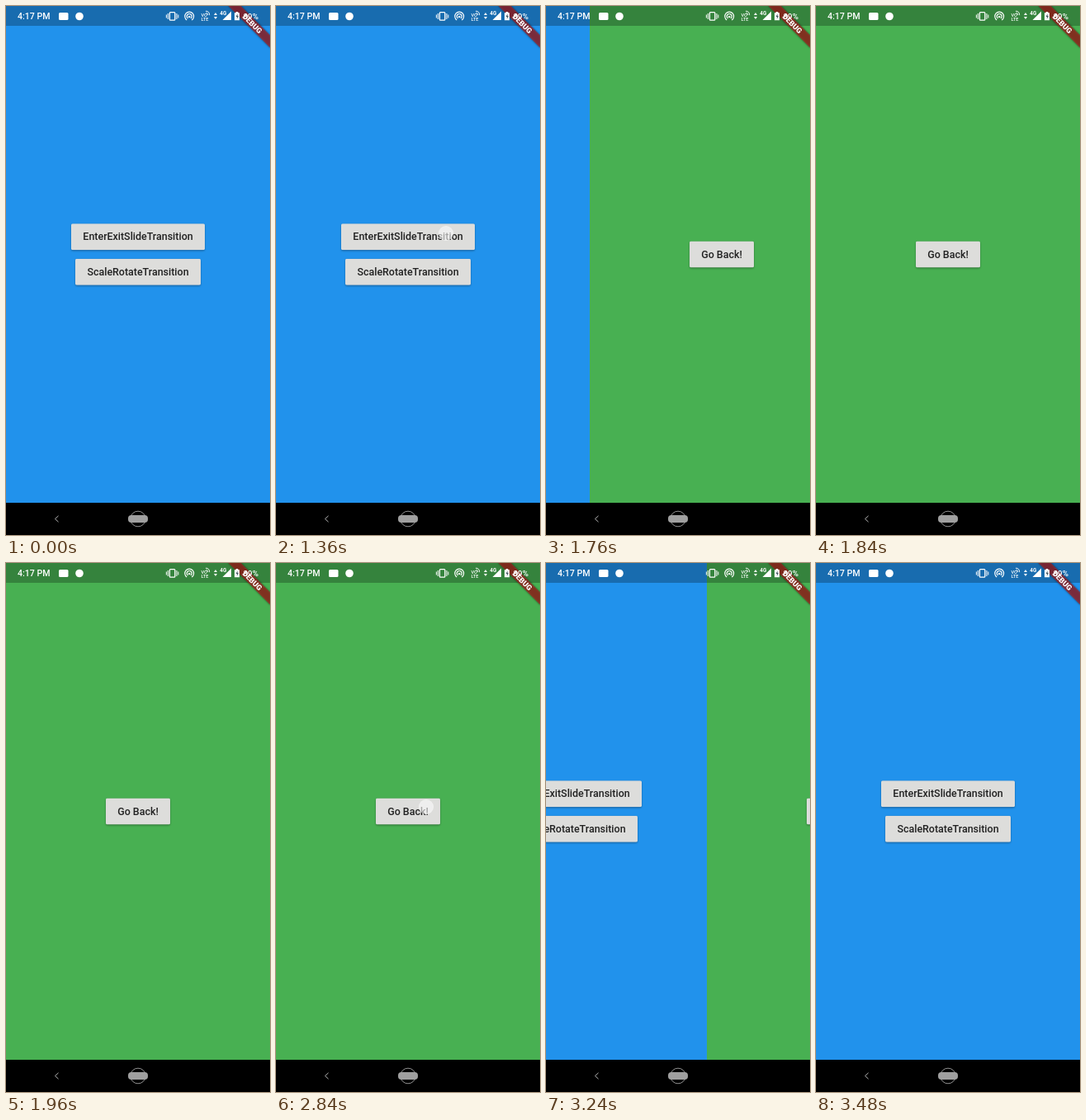
Animation, 320 px wide and 640 px high, one loop 3.56 s. Source, as an HTML page:

```html
<!DOCTYPE html>
<html lang="en">
<head>
<meta charset="utf-8">
<title>Enter/exit slide transition</title>
<style>
  html, body { margin: 0; width: 100%; height: 100%; overflow: hidden; background: #000; }
  svg { display: block; }
  text { font-family: Roboto, sans-serif; font-weight: 500; fill: #fff; }
  .button text { font-size: 12.44px; fill: #212121; text-anchor: middle; }
  .line { fill: none; stroke: #fff; }
</style>
</head>
<body>
<svg id="stage" width="320" height="640" viewBox="0 0 320 640">
  <defs>
    <filter id="blur" x="-20%" y="-60%" width="140%" height="220%"><feGaussianBlur stdDeviation="1"/></filter>
  </defs>

  <g id="home"><rect width="320" height="601" fill="#2192ec"/></g>
  <g id="detail"><rect width="320" height="601" fill="#48b052"/></g>

  <rect width="320" height="24" opacity=".26"/>
  <g transform="translate(320 0) rotate(45)">
    <rect x="-36" y="24.9" width="72" height="10.7" opacity=".5" filter="url(#blur)"/>
    <rect x="-36" y="24.9" width="72" height="10.7" fill="#b71c1c" opacity=".63"/>
    <text y="33.5" font-size="9.07" style="font-weight:900" text-anchor="middle">DEBUG</text>
  </g>

  <g id="status" fill="#fff">
    <text x="14" y="16.3" font-size="10.6">4:17 PM</text>
    <rect x="64" y="8" width="11.5" height="9" rx="1.5"/>
    <circle cx="89" cy="12.5" r="4.8"/>
    <!-- vibrate -->
    <rect class="line" x="198.4" y="7.6" width="6.4" height="9.6" rx="1" stroke-width="1.3"/>
    <path class="line" d="M196.3 9v7M194.4 10.5v4M206.9 9v7M208.8 10.5v4"/>
    <!-- hotspot -->
    <path class="line" stroke-width="1.2" d="M219.2 17a5.4 5.4 0 1 1 6 0M220.4 14.9a3 3 0 1 1 3.6 0"/>
    <circle cx="222.2" cy="13" r="1.3"/>
    <!-- VoLTE -->
    <text x="236.5" y="12.5" font-size="5.5">VO</text>
    <text x="236.5" y="18.3" font-size="5.5">LTE</text>
    <path class="line" stroke-width=".9" d="M242 6.2q4.7 0 4.7 5M242.5 8.4q2.3 0 2.3 2.6"/>
    <path d="M252 11l2-3 2 3zM252 13l2 3 2-3z"/>
    <!-- signal and battery -->
    <text x="259.3" y="11.3" font-size="6.3" style="font-weight:700">4G</text>
    <path d="M273 6.5v10.5h-10.5z"/>
    <path d="M278.7 7h2.6v1.2h1.7v9h-6v-9h1.7z"/>
    <path d="M280.6 9.5l-2 3.5h1.3v2.7l2-3.6h-1.3z" fill="#465a66"/>
    <text x="287.5" y="16" font-size="9.8">89%</text>
  </g>

  <rect y="601" width="320" height="39"/>
  <path class="line" d="M63.5 616.8l-3.9 3.7 3.9 3.7" opacity=".7"/>
  <circle class="line" cx="160" cy="620.5" r="9.3" stroke-width=".8" opacity=".7"/>
  <rect x="148" y="616" width="24" height="9" rx="4" fill="#a0a0a0"/>

  <circle id="touch" r="9" fill="#fff"/>
</svg>
<script>
const LOOP = 3560, STEP = 40, SLIDE = 300, WIDTH = 320;
const PUSH = 1510, POP = 3057;
const $ = id => document.getElementById(id);
const clamp = v => Math.min(1, Math.max(0, v));

function addButton(page, label, x, y, w, press) {
  $(page).insertAdjacentHTML('beforeend', `
    <rect x="${x}" y="${y + 1}" width="${w}" height="32" rx="2" opacity=".32" filter="url(#blur)"/>
    <svg class="button" x="${x}" y="${y}" width="${w}" height="32">
      <rect width="${w}" height="32" rx="1.8" fill="#dddddb"/>
      <rect class="highlight" width="${w}" height="32" rx="1.8" fill="#bcbcbc" opacity="0"/>
      <circle class="splash" fill="#c8c8c8" opacity="0"/>
      <text x="${w / 2}" y="20.3">${label}</text>
    </svg>`);
  if (!press) return;
  const node = $(page).lastElementChild;
  press.highlight = node.querySelector('.highlight');
  press.splash = node.querySelector('.splash');
  press.splash.setAttribute('cx', press.x - x);
  press.splash.setAttribute('cy', press.y - y);
}

const presses = [
  { x: 206, y: 275, down: 1360, up: 1480 },
  { x: 182, y: 295, down: 2840, up: 3020 }
];
addButton('home', 'EnterExitSlideTransition', 79, 263.2, 162, presses[0]);
addButton('home', 'ScaleRotateTransition', 84, 305.8, 152);
addButton('detail', 'Go Back!', 121, 284.5, 78, presses[1]);

function drawPress(p, t) {
  const age = t - p.down;
  const fade = age < 0 ? 0 : 1 - clamp((t - p.up) / 200);
  p.highlight.setAttribute('opacity', .4 * fade * clamp(age / 200));
  p.splash.setAttribute('opacity', .4 * fade);
  p.splash.setAttribute('r', Math.max(0, 8 + age * .16));
}

function draw(t) {
  const shown = clamp((t - PUSH) / SLIDE) - clamp((t - POP) / SLIDE);
  const edge = Math.round(WIDTH * (1 - shown));
  $('home').setAttribute('transform', `translate(${edge - WIDTH} 0)`);
  $('detail').setAttribute('transform', `translate(${edge} 0)`);
  presses.forEach(p => drawPress(p, t));

  const active = presses.find(p => t >= p.down && t < p.up);
  $('touch').setAttribute('opacity', active ? .6 : 0);
  if (active) {
    $('touch').setAttribute('cx', active.x);
    $('touch').setAttribute('cy', active.y);
  }
}

function tick() {
  draw(Math.floor(performance.now() % LOOP / STEP) * STEP);
  requestAnimationFrame(tick);
}
tick();
</script>
</body>
</html>
```
